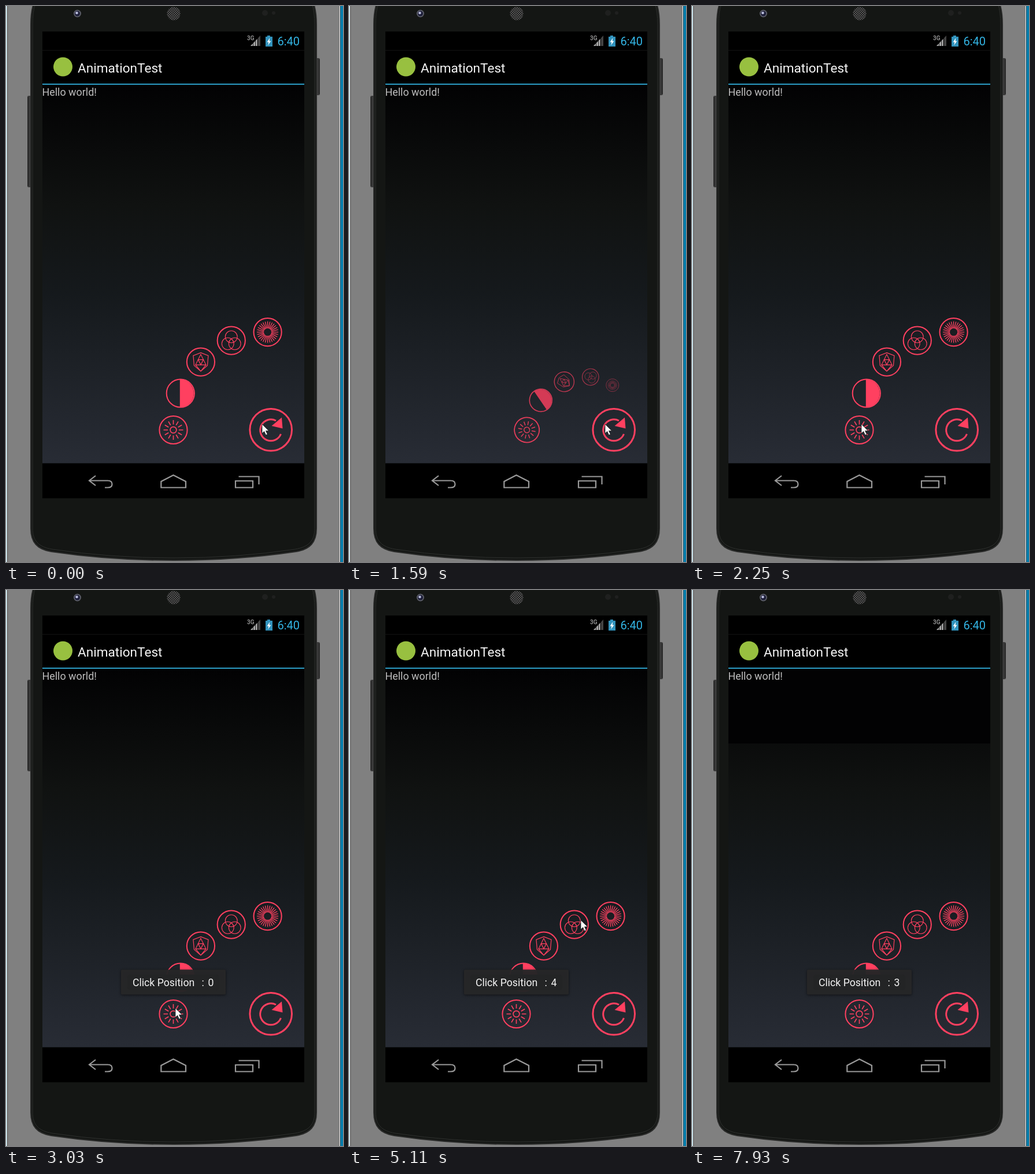
These frames come from a looping animation (583 by 960 pixels, 7.96 s). An HTML page:

```html
<!DOCTYPE html>
<html lang="en">
<head>
<meta charset="utf-8">
<title>Arc menu</title>
<style>
html, body { margin: 0; width: 100%; height: 100%; overflow: hidden; background: #808080; }
svg { display: block; width: 583px; height: 960px; }
text { font-family: Roboto, sans-serif; white-space: pre; }
.line { fill: none; stroke: #ff4060; }
.nav { fill: none; stroke: #9a9a9a; stroke-width: 2.2; }
.box { fill: #272829; fill-opacity: .95; filter: drop-shadow(0 1px 2px #0009); }
</style>
</head>
<body>
<svg viewBox="0 0 583 960">
  <defs>
    <linearGradient id="bg" x1="0" y1="0" x2="0" y2="1">
      <stop offset="0" stop-color="#020203"/>
      <stop offset=".32" stop-color="#101211"/>
      <stop offset=".55" stop-color="#15191c"/>
      <stop offset="1" stop-color="#282c35"/>
    </linearGradient>
    <pattern id="mesh" width="4" height="4" patternUnits="userSpaceOnUse">
      <rect width="4" height="4" fill="#1d1d1d"/>
      <circle cx="1" cy="1" r="1" fill="#686868"/><circle cx="3" cy="3" r="1" fill="#686868"/>
    </pattern>
  </defs>

  <!-- backdrop -->
  <rect width="583" height="960" fill="#808080"/>
  <rect width="1" height="960" fill="#b5dbe6"/>
  <rect x="1" width="1" height="960" fill="#e8f2f5"/>
  <rect x="2" width="1" height="960" fill="#444"/>
  <rect x="577" width="1" height="960" fill="#f4f8fa"/>
  <rect x="578" width="1" height="960" fill="#0d3c50"/>
  <rect x="579" width="4" height="960" fill="#057fae"/>

  <!-- phone -->
  <rect x="37" y="155" width="7" height="158" rx="2" fill="#3b3b3b"/>
  <rect x="37.5" y="157" width="1.5" height="154" fill="#222"/>
  <rect x="536" y="90" width="7" height="64" rx="2" fill="#3b3b3b"/>
  <rect x="541" y="92" width="1.5" height="60" fill="#222"/>
  <path d="M48 -5Q43 10 43 32V902C43 926 54 938 78 942Q180 957 290 957T502 942C526 938 537 926 537 902V32Q537 10 532 -5Z" fill="#141614" stroke="#282928" stroke-width="2"/>
  <path d="M51 -5Q46 10 46 32V902C46 923 56 934 80 938Q180 953 290 953T500 938C524 934 534 923 534 902V32Q534 10 529 -5" fill="none" stroke="#2e302e"/>
  <circle cx="123.500" cy="13" r="6.500" fill="#5a5c66"/>
  <circle cx="123.500" cy="13" r="4.500" fill="#1c1d38"/>
  <circle cx="122.500" cy="12" r="2.300" fill="#b9bcdc"/>
  <circle cx="290" cy="13" r="11.500" fill="url(#mesh)"/>
  <circle cx="448" cy="12" r="5" fill="#1f201f"/>
  <circle cx="463" cy="12" r="3" fill="#1f201f"/>

  <!-- screen -->
  <rect x="63" y="44" width="453" height="806"/>
  <rect x="63" y="76" width="453" height="1" fill="#121212"/>
  <rect x="63" y="136" width="453" height="653.500" fill="url(#bg)"/>
  <rect id="shade" x="63" y="136" width="453" height="129" fill="#020203"/>
  <rect x="63" y="134" width="453" height="2" fill="#2b9cc5"/>
  <text x="417" y="59" font-size="10" font-weight="500" fill="#a5a5a5">3G</text>
  <path d="M423 69L440 51V69Z" fill="#444"/>
  <path d="M423 69L434.500 57V69Z" fill="#a9a9a9"/>
  <path d="M427.500 60V70M431.500 56V70M435.500 52V70" stroke="#000" stroke-width=".8"/>
  <path d="M452 51H457V53H461V70H449V53H452Z" fill="#3293bd"/>
  <path d="M456.500 55L451.500 62.500H454.500L453 68L458.500 60.500H455.500Z" fill="#fff"/>
  <text x="469.500" y="68" font-size="20" fill="#33b5e5">6:40</text>
  <circle cx="98.500" cy="105" r="16.500" fill="#98c040"/>
  <text x="124" y="115" font-size="22.600" fill="#f5f5f5">AnimationTest</text>
  <text x="62.500" y="155" font-size="17.900" fill="#bebebe">Hello world!</text>
  <g class="nav">
    <path d="M155 811L144 819.500L155 828M144.500 819.500H176Q183.500 819.500 183.500 825.500T176 831.500H171"/>
    <path d="M268.300 831.500V821L289.500 810L311 821V831.500Z"/>
    <path d="M397 820H427V831.500H397ZM402.500 812.500H437.500V826"/>
  </g>

  <g id="menu"></g>
  <g class="line" stroke-width="3">
    <circle cx="458.200" cy="731.700" r="36.300"/>
    <path d="M475.500 739A18.500 18.500 0 1 1 467 716"/>
    <path d="M477 710.500L478.500 729.500L459.500 725Z" fill="#ff4060" stroke="none"/>
  </g>
  <g id="toasts"></g>
  <path id="cursor" d="M0 0V16L3.700 12.600L6.600 18.800L9.300 17.600L6.500 11.600H11.700Z" fill="#fff" stroke="#222" stroke-width=".8"/>
</svg>
<script>
const $ = id => document.getElementById(id);
const LOOP = 7960, HUB = [458.5, 732], REACH = 169;

const spokes = (n, from, to, width) => {
  let d = '';
  for (let i = 0; i < n; i++) {
    const a = i / n * 2 * Math.PI, c = Math.cos(a), s = Math.sin(a);
    d += `M${c * from} ${s * from}L${c * to} ${s * to}`;
  }
  return `<path d="${d}" stroke-width="${width}"/>`;
};
const ring = (x, y, r, width) => `<circle cx="${x}" cy="${y}" r="${r}" stroke-width="${width}"/>`;

const icons = [
  ring(0, 0, 5.4, 1.6) + spokes(12, 9.5, 17, 1.6),
  '<path d="M-1 -24A24 24 0 0 1 -1 24Z" fill="#ff4060" stroke="none"/>',
  '<path d="M0 -16L13 -11L11.500 6L0 16L-11.500 6L-13 -11ZM0 -13L-9 5H9ZM-4.500 -4H4.500L0 5ZM-9 5L0 16L9 5" stroke-width="1.200"/>',
  ring(0, -6.5, 10.4, 1.1) + ring(-6, 5.5, 10.4, 1.1) + ring(6, 5.5, 10.4, 1.1),
  spokes(28, 6.5, 18.5, 1.3)
];
$('menu').innerHTML = icons.map(icon => `<g class="line">${ring(0, 0, 24.1, 2)}${icon}</g>`).join('');
const items = [...$('menu').children];

// Toasts: message number, time it appears, time it is replaced
const messages = [[0, 2665, 4475], [4, 4475, 5905], [3, 5905, LOOP * 2]];
$('toasts').innerHTML = messages.map(([n]) => `<g>
  <rect class="box" x="199" y="655.500" width="181" height="43" rx="2"/>
  <rect x="210" y="664" width="159" height="27" rx="5" fill="#232425"/>
  <g font-size="17.700" fill="#f4f4f4"><text x="219" y="684">Click Position</text><text x="338.500" y="684">:</text><text x="349.500" y="684">${n}</text></g></g>`).join('');
const toasts = [...$('toasts').children];

// Pointer stops: time, x, y
const stops = [
  [0, 443, 722], [1850, 443, 722], [2250, 293, 722], [3330, 293, 722], [3850, 457, 566],
  [4800, 457, 566], [5110, 401, 570], [6260, 401, 570], [6710, 434, 649], [6910, 426, 650.5],
  [7080, 556, 829], [7350, 556, 829], [7470, 550, 846], [7750, 574, 964], [LOOP, 574, 964]
];

const clamp = v => Math.max(0, Math.min(1, v));
const smooth = k => k * k * (3 - 2 * k);
const overshoot = k => 1 + (k - 1) ** 2 * (3 * (k - 1) + 2);
const anticipate = k => k * k * (4 * k - 3);

function openness(t, i) {
  return t < 1200
    ? 1 - anticipate(clamp((t - 472 - 15 * i) / 250))
    : overshoot(clamp((t - 1431 - 24 * i) / 600));
}

function pointer(t) {
  const i = stops.findIndex(s => s[0] > t);
  const [t0, x0, y0] = stops[i - 1], [t1, x1, y1] = stops[i];
  const k = smooth((t - t0) / (t1 - t0));
  return [x0 + (x1 - x0) * k, y0 + (y1 - y0) * k];
}

function draw(t) {
  items.forEach((el, i) => {
    const k = openness(t, i), a = 22 * i * Math.PI / 180;
    const x = HUB[0] - Math.cos(a) * REACH * k, y = HUB[1] - Math.sin(a) * REACH * k;
    el.setAttribute('transform', `translate(${x} ${y}) rotate(${180 * (k - 1)}) scale(${k})`);
    el.setAttribute('opacity', clamp(k));
  });
  toasts.forEach((el, i) => {
    const [, start, end] = messages[i];
    const fadeIn = 1 - (1 - clamp((t - start) / 380)) ** 2;
    const fadeOut = clamp((t - end) / 380) ** 2;
    el.setAttribute('opacity', fadeIn * (1 - fadeOut));
  });
  $('cursor').setAttribute('transform', `translate(${pointer(t)})`);
  $('shade').setAttribute('opacity', t >= 7930 ? 1 : 0);
}

const begin = performance.now();
function tick() {
  draw((performance.now() - begin) % LOOP);
  requestAnimationFrame(tick);
}
tick();
</script>
</body>
</html>
```
